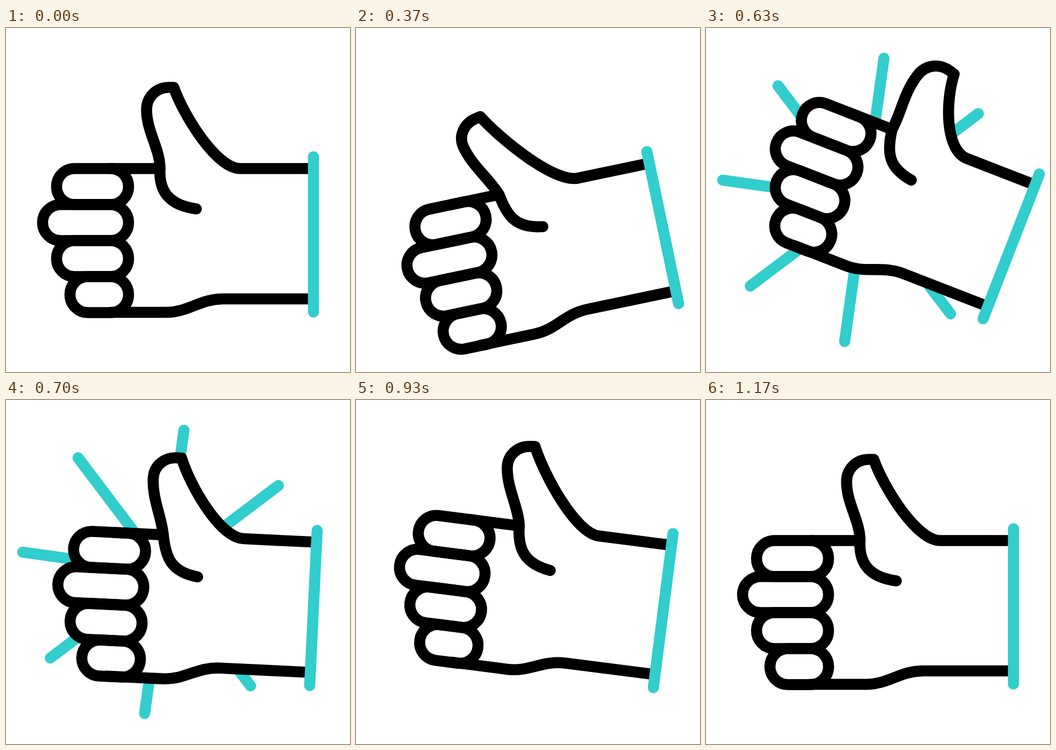
Recreate the animation shown at these times as an HTML page. Size 640x640 px, loop 1670 ms.

```html
<!DOCTYPE html>
<html lang="en">
<head>
<meta charset="utf-8">
<title>Thumbs up</title>
<style>
  html, body { margin: 0; width: 100%; height: 100%; overflow: hidden; background: #fff; }
  svg { display: block; width: 100%; height: 100%; }
  .line { fill: none; stroke: #000; stroke-width: 20.6; stroke-linecap: round; stroke-linejoin: round; }
  .teal { stroke: #32cdcd; }
  .body { fill: #fff; }
</style>
</head>
<body>
<svg viewBox="0 0 640 640">
  <path id="rays" class="line teal"/>
  <g id="hand">
    <path id="palm" class="body"/>
    <g id="pads" class="body"></g>
    <path id="outline" class="line"/>
    <g id="fingers" class="line"></g>
    <path class="line teal" d="M572 239.5V528.5"/>
  </g>
</svg>
<script>
const LOOP = 1670, FRAME = 1000 / 30;
const KNUCKLE = 261.5, RIGHT = 194.5, PITCH = 67, SLIDE = 27;
const $ = id => document.getElementById(id);

// Smooth step from 0 to 1 while n runs from a to b.
function ease(n, a, b) {
  const u = Math.min(1, Math.max(0, (n - a) / (b - a)));
  return u * u * (3 - 2 * u);
}

// Value at frame n: each [frame, value] is reached by an eased move from the one before.
const at = (keys, n) => keys.slice(1).reduce(
  (v, [f, to], i) => v + (to - keys[i][1]) * ease(n, keys[i][0], f), keys[0][1]);

const TURN = [[3, 0], [11, -11.8], [18, 22.8], [18.4, 22.8], [23.1, -11.8], [27.4, 7.4], [35, 0]];
const LEAN = [[3, 0], [11, -0.2], [18, 0.35], [23.2, -0.2], [24, -0.2], [32, 0]];

function pill(parent, left, row) {
  const r = PITCH / 2;
  const el = document.createElementNS("http://www.w3.org/2000/svg", "rect");
  const box = { x: left - r, y: KNUCKLE + row * PITCH, width: RIGHT - left + PITCH, height: PITCH, rx: r };
  for (const k in box) el.setAttribute(k, box[k]);
  parent.appendChild(el);
  return el;
}
const pills = [127.5, 101.5, 127.5, 152.5].map(
  (left, row) => [pill($("pads"), left, row), pill($("fingers"), left, row)]);

// The thumb leans by a shear that grows with height, its top tilting along.
function thumbPath(n, bend) {
  const lean = at(LEAN, n);
  const p = (x, y) => {
    const h = KNUCKLE - y;
    const drop = h * (0.043 * bend + lean * (x - 289) / 151);
    return `${(x + lean * h).toFixed(2)} ${(y + drop).toFixed(2)} `;
  };
  return "C" + p(287 - 6 * bend, 226) + p(261.5, 192) + p(261.5, 152) +
    "C" + p(261.5, 128) + p(280, 110.5) + p(303, 110.5) +
    "L" + p(312, 110.5) +
    "C" + p(331, 164) + p(392, KNUCKLE) + p(436, KNUCKLE);
}

function rayPath(n) {
  const radius = (a, b) => 30 + 236 * ease(n, a, b);
  const inner = radius(18, 28), outer = radius(10, 18);
  if (outer - inner < 0.5) return "";
  let d = "";
  for (let i = 0; i < 8; i++) {
    const a = (7.9 + 45 * i) * Math.PI / 180;
    const point = r => [294.5 + r * Math.sin(a), 319.7 - r * Math.cos(a)].map(v => v.toFixed(2));
    d += `M${point(inner)}L${point(outer)}`;
  }
  return d;
}

function draw(n) {
  const bend = ease(n, 3, 11) - ease(n, 24, 32);
  const thumb = thumbPath(n, bend);
  const heel = "H404C360 504 340 529 298 529H194.5";
  $("rays").setAttribute("d", rayPath(n));
  $("palm").setAttribute("d", `M194.5 529V261.5H286.5${thumb}H572V504${heel}Z`);
  $("outline").setAttribute("d", `M194.5 261.5H286.5M354 336.5` +
    `C306 330 ${284 + 9 * bend} 306 286.5 261.5${thumb}H566M566 504${heel}`);
  $("hand").setAttribute("transform", `rotate(${at(TURN, n)} 510.5 384)`);

  // Fingers slide in from the top down; on the way back the second one leads.
  pills.forEach((pair, i) => {
    const start = 3.8 + 1.1 * i, back = 20.8 + 0.55 * ((i + 3) % 4);
    const dx = SLIDE * (ease(n, start, start + 8) - ease(n, back, 31 + 0.55 * i));
    for (const el of pair) el.setAttribute("transform", `translate(${dx} 0)`);
  });
}

const begin = performance.now();
function tick() {
  const t = (performance.now() - begin) % LOOP;
  draw(Math.floor((t + 3.4) / FRAME));
  requestAnimationFrame(tick);
}
tick();
</script>
</body>
</html>
```
